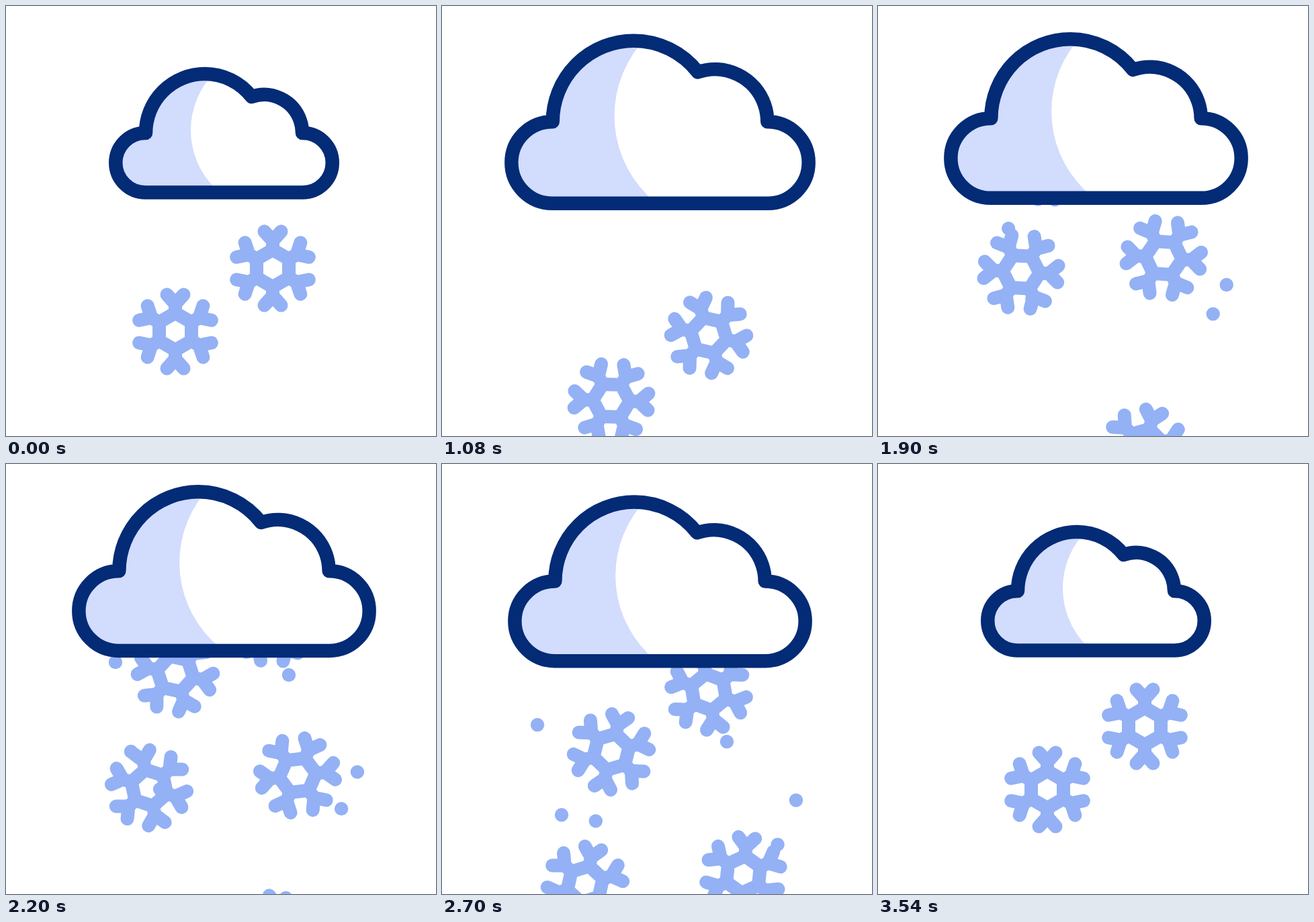
An HTML page with a canvas that plays this animation: 640x640 px, repeating every 3600 ms.

```html
<!DOCTYPE html>
<html lang="en">
<head>
<meta charset="utf-8">
<title>Snow cloud</title>
<style>
  html, body { margin: 0; width: 100%; height: 100%; overflow: hidden; background: #fff; }
  canvas { display: block; width: 640px; height: 640px; }
</style>
</head>
<body>
<canvas id="stage" width="640" height="640"></canvas>
<script>
const ctx = document.getElementById('stage').getContext('2d');
const { PI, sin, cos, atan2, exp, min, max } = Math;
const LOOP = 3600;
const NAVY = '#032b76', SHADE = '#d2dcfd', SNOW = '#93b1f4';
const REST_Y = 189;

// Eased 0 to 1 between two times.
function ramp(t, from, to) {
  const u = max(0, min(1, (t - from) / (to - from)));
  return u * u * (3 - 2 * u);
}

// Grow past the full size, settle, bob once, shrink back.
function cloudPose(t) {
  const grow = ramp(t, 80, 845);
  const shrink = ramp(t, 2860, 3520);
  const bob = 1 - cos(2 * PI * max(0, min(1, (t - 1510) / 1400)));
  return {
    scale: 1 + 0.405 * grow - 0.0645 * ramp(t, 845, 1303) - 0.3405 * shrink,
    y: REST_Y - 30 * grow + 19.5 * ramp(t, 780, 1260) - 9.6 * bob + 10.5 * shrink
  };
}

// Flakes turn in proportion to the distance they fall.
const depart = (x, rest, start, distance, spin) => t => {
  const fallen = distance * ramp(t, start, start + 2286);
  return { x, y: rest + fallen, turn: spin * fallen };
};
const arrive = (x, rest, end, distance, spin) => t => {
  const left = distance * (1 - ramp(t, end - 2375, end));
  return { x, y: rest - left, turn: spin * left };
};
const fall = (x, y, turn, drift, speed, spin) => t => {
  const dt = t - 2200;
  return { x: x + drift * dt, y: y + speed * dt, turn: turn + spin * dt };
};

const flakes = [
  { from: 0, pose: depart(252, 484.5, 180, 300, 0.31) },
  { from: 0, pose: depart(397, 390.5, 240, 326, -0.17) },
  { from: 1300, pose: fall(213, 482, 48, 0, 0.287, 0.0493) },
  { from: 1300, pose: fall(434, 463.5, 23.5, 0.029, 0.295, -0.036) },
  { from: 1850, pose: arrive(252, 484.5, 3244, 420, 0.245) },
  { from: 1900, pose: arrive(397, 390.5, 3264, 358, -0.19) }
];

// Dots shoot out of the cloud and slow down.
const dots = [
  { launch: 1300, x: 497, drift: 3, reach: 370 },
  { launch: 1300, x: 503, drift: 28, reach: 293 },
  { launch: 1300, x: 230.5, drift: -2, reach: 329 },
  { launch: 1719, x: 201, drift: -31, reach: 367 },
  { launch: 1998, x: 419, drift: 8, reach: 263 },
  { launch: 2044, x: 173, drift: -52, reach: 232 }
];

function disc(x, y, r, color) {
  ctx.fillStyle = color;
  ctx.beginPath();
  ctx.arc(x, y, r, 0, 2 * PI);
  ctx.fill();
}

function drawFlake({ x, y, turn }) {
  ctx.save();
  ctx.translate(x, y);
  ctx.rotate(turn * PI / 180);
  ctx.lineWidth = 20;
  ctx.strokeStyle = SNOW;
  ctx.lineCap = 'round';
  ctx.lineJoin = 'miter';
  ctx.beginPath();
  for (let i = 0; i < 6; i++) {
    const a = i * PI / 3;
    ctx.lineTo(27.7 * sin(a), -27.7 * cos(a));
  }
  ctx.closePath();
  ctx.stroke();
  ctx.lineJoin = 'round';
  for (let i = 0; i < 6; i++) {
    ctx.beginPath();
    ctx.moveTo(-12.5, -55);
    ctx.lineTo(0, -41);
    ctx.lineTo(12.5, -55);
    ctx.moveTo(0, -41);
    ctx.lineTo(0, -29);
    ctx.stroke();
    ctx.rotate(PI / 3);
  }
  ctx.restore();
}

function drawDot({ launch, x, drift, reach }, t) {
  if (t < launch) return;
  const travel = 1 - exp(-0.00138 * (t - launch));
  disc(x + drift * travel, 250 + reach * travel, 10.2, SNOW);
}

function traceCloud(x, y, scale) {
  ctx.save();
  ctx.translate(x, y);
  ctx.scale(scale, scale);
  ctx.beginPath();
  ctx.arc(-117, 44.25, 44.25, PI / 2, 1.5 * PI);
  ctx.arc(-28.5, 0, 88, PI, atan2(-53.9, 69.5));
  ctx.arc(59.5, 0, 57, atan2(-53.9, -18.5), 0);
  ctx.arc(117, 44.25, 44.25, -PI / 2, PI / 2);
  ctx.closePath();
  ctx.restore();
}

function drawCloud(t) {
  const x = 324.5, { y, scale } = cloudPose(t);
  const lightY = REST_Y - 4.2 + 1.28 * (y - REST_Y);
  traceCloud(x, y, scale);
  ctx.fillStyle = SHADE;
  ctx.fill();
  ctx.save();
  ctx.clip();
  disc(x + 72 * scale, lightY, 121.5 * scale, '#fff');
  ctx.restore();
  traceCloud(x, y, scale);
  ctx.lineWidth = 20.5;
  ctx.lineJoin = 'round';
  ctx.strokeStyle = NAVY;
  ctx.stroke();
}

function draw(t) {
  ctx.fillStyle = '#fff';
  ctx.fillRect(0, 0, 640, 640);
  for (const { from, pose } of flakes) {
    if (t >= from) drawFlake(pose(t));
  }
  ctx.globalAlpha = 1 - ramp(t, 3300, 3540);
  for (const d of dots) drawDot(d, t);
  ctx.globalAlpha = 1;
  drawCloud(t);
}

let start;
function tick(now) {
  start ??= now;
  draw((now - start) % LOOP);
  requestAnimationFrame(tick);
}
draw(0);
requestAnimationFrame(tick);
</script>
</body>
</html>
```
